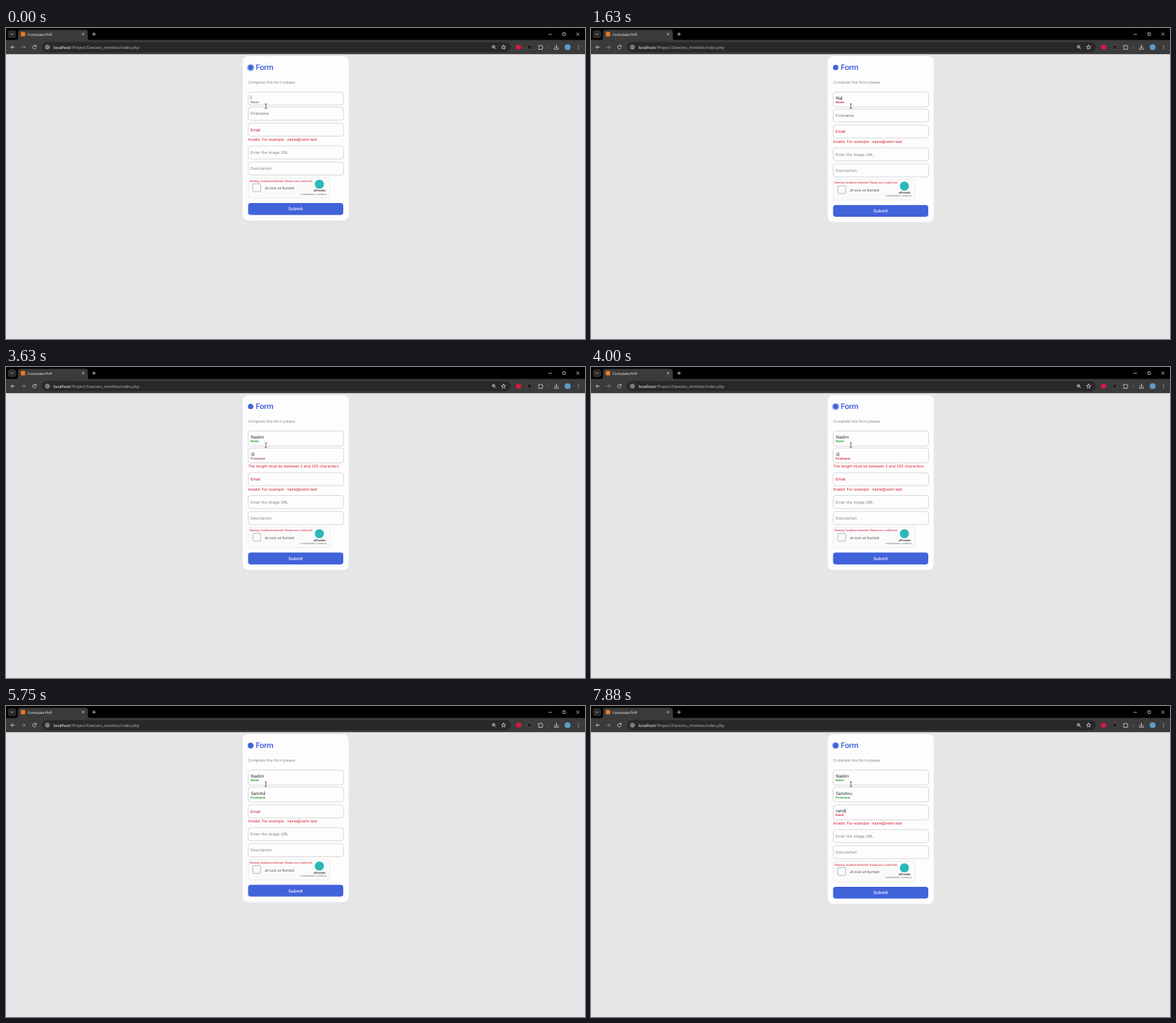
These frames come from a looping animation (800 by 430 pixels, 8000 ms). An HTML page:

```html
<!DOCTYPE html>
<html lang="en">
<head>
<meta charset="utf-8">
<title>Form</title>
<style>
  html, body { margin: 0; width: 100%; height: 100%; overflow: hidden; background: #e5e6e8; }
  svg { display: block; width: 100vw; height: 100vh; }
  text { text-rendering: geometricPrecision; white-space: pre; }
  .ui { font-family: Roboto, sans-serif; }
  .form { font-family: Inter, sans-serif; }
  .line { fill: none; stroke: #dedede; stroke-width: .75; stroke-linecap: round; stroke-linejoin: round; }
  .box { fill: #fdfdfe; stroke: #b9b9bc; stroke-width: .55; }
  .hint { font-size: 5.4px; fill: #808080; }
  .error { font-size: 5.25px; fill: #d9142f; }
  .typed { font-size: 6px; fill: #2b2b2b; }
</style>
</head>
<body>
<svg viewBox="0 0 800 430" xmlns="http://www.w3.org/2000/svg">
  <rect width="800" height="430" fill="#e5e6e8"/>
  <path d="M470 36H788V390H715L475 272Z" fill="#e6e6e6"/>

  <g class="ui">
    <rect width="800" height="17" fill="#000"/>
    <rect y="16.5" width="800" height="19.7" fill="#3b3b3b"/>
    <rect x="2.5" y="3" width="11.5" height="11" rx="3.5" fill="#2b2b2b"/>
    <path class="line" d="M6.8 7.8L8.3 9.3L9.8 7.8"/>
    <path d="M13 17Q16.5 17 16.5 13.5V6Q16.5 2.5 20 2.5H109.5Q113 2.5 113 6V13.5Q113 17 116.5 17Z" fill="#3b3b3b"/>
    <rect x="20.5" y="5.5" width="6" height="6" rx="1" fill="#f07a24"/>
    <text x="30" y="10.5" font-size="4.85" fill="#eee">Formulaire PHP</text>
    <path class="line" d="M105.2 7L108 9.8M108 7L105.2 9.8M119.5 8.5H123.7M121.6 6.4V10.6"/>
    <path class="line" d="M750 8.8H754M788.3 6.7L791.9 10.3M791.9 6.7L788.3 10.3"/>
    <rect class="line" x="769.5" y="6.8" width="3.6" height="3.6" rx=".5"/>

    <path class="line" d="M11.7 26.5H7M9.2 24.2L6.9 26.5L9.2 28.8"/>
    <path class="line" d="M21.7 26.5H26.4M24.2 24.2L26.5 26.5L24.2 28.8" opacity=".5"/>
    <path class="line" d="M41.3 25A2.5 2.5 0 1 0 41.7 27.2M41.7 23.7V25.4H39.9"/>
    <rect x="49.5" y="19.5" width="648" height="14" rx="7" fill="#282828"/>
    <circle cx="57.2" cy="26.5" r="4.6" fill="#3b3b3b"/>
    <circle class="line" cx="57.2" cy="26.5" r="2.4"/>
    <path class="line" d="M57.2 26.3V27.7M57.2 25.2V25.3"/>
    <text x="65.5" y="28.5" font-size="5.75" fill="#a8a8a8"><tspan fill="#f2f2f2">localhost</tspan>/Project/Dancers_mirettes/index.php</text>
    <circle class="line" cx="673.5" cy="25.9" r="1.8"/>
    <path class="line" d="M674.9 27.3L676.7 29.1M672.8 25.9H674.2"/>
    <path class="line" d="M687.5 23.6L688.3 25.5L690.4 25.7L688.8 27.1L689.3 29.2L687.5 28.1L685.7 29.2L686.2 27.1L684.6 25.7L686.7 25.5Z"/>
    <circle cx="708.3" cy="26.5" r="3.6" fill="#d81842"/>
    <rect x="720.7" y="23.7" width="5.6" height="5.6" rx="1" fill="#1f1f1f" stroke="#666" stroke-width=".5"/>
    <path class="line" d="M736 24.5H737.5A1 1 0 0 1 739.5 24.5H741V26A1 1 0 0 1 741 28V29.5H736V27.8A1 1 0 0 0 736 26Z"/>
    <path d="M749.7 23V30" stroke="#686868" stroke-width=".6"/>
    <path class="line" d="M760.5 23.5V27.5M758.7 25.9L760.5 27.7L762.3 25.9M757.8 27.7V29.4H763.2V27.7"/>
    <circle cx="776" cy="26.5" r="4.1" fill="#5b9bc9"/>
    <path class="line" style="stroke-width: 1.1" d="M791 24.2V24.3M791 26.5V26.6M791 28.8V28.9"/>
  </g>

  <g class="form">
    <rect id="card" x="327" y="39" width="146.5" height="227" rx="7.5" fill="#fdfdfe"/>
    <circle id="halo" cx="338" cy="54.7" r="3.6" fill="#4163da"/>
    <circle cx="338" cy="54.7" r="3.6" fill="#4163da"/>
    <text x="345.1" y="58.3" font-size="10.5" font-weight="600" letter-spacing="-.45" fill="#4163da">Form</text>
    <text x="334.5" y="77.2" font-size="5.25" fill="#858585">Complete this form please</text>
    <g id="fields"></g>
    <g id="rest">
      <rect class="box" x="334.6" width="132" height="18" rx="3.75"/>
      <text class="hint" x="338" y="11">Enter the image URL</text>
      <rect class="box" x="334.6" y="22.2" width="132" height="18" rx="3.75"/>
      <text class="hint" x="338" y="33.2">Description</text>
      <g class="ui" transform="translate(0 43.7)">
        <rect x="334.7" width="113" height="28.5" rx="1.5" fill="#fafafa" stroke="#dedede" stroke-width=".5"/>
        <text x="336.5" y="6" font-size="3.75" fill="#d9142f">Warning: localhost detected. Please use a valid host.</text>
        <rect x="341" y="8.7" width="10.8" height="10.8" rx="1.3" fill="#fafafa" stroke="#8d8d8d" stroke-width=".6"/>
        <text x="357.3" y="16.5" font-size="5.1" fill="#555">Je suis un humain</text>
        <circle cx="433" cy="9.2" r="6.3" fill="#2bb8b8"/>
        <text x="433.3" y="19.7" font-size="4.1" font-weight="700" text-anchor="middle" fill="#444">qProvelo</text>
        <text x="425" y="23.9" font-size="3" text-anchor="middle" fill="#555">Confidentialité - Conditions</text>
      </g>
      <rect x="334.5" y="79" width="131.5" height="16.3" rx="3.75" fill="#4163da"/>
      <text x="400" y="89.3" font-size="6" font-weight="500" text-anchor="middle" fill="#fff">Submit</text>
    </g>
  </g>

  <path d="M357.5 104.7Q359 104.7 359 105.7Q359 104.7 360.5 104.7M359 105.5V110.7M357.5 111.5Q359 111.5 359 110.5Q359 111.5 360.5 111.5" fill="none" stroke="#333" stroke-width=".7"/>
</svg>

<script>
const LOOP = 8000, STEP = 125, FADE = 300, ROW_GAP = 4.2, ERROR_ROW = 9.3;
const GREY = [110, 110, 110], RED = [214, 20, 45], GREEN = [20, 150, 30];
const LENGTH_ERROR = 'The length must be between 2 and 255 characters';

// keys: the time at which each letter appears
const fields = [
  { label: 'Name', text: 'Nadim', focus: -FADE, blur: 2700, gap: 2.8,
    keys: [1000, 1625, 1875, 2125, 2375] },
  { label: 'Firstname', text: 'Salvitou', focus: 2700, blur: 6375, gap: ROW_GAP,
    keys: [3505, 4125, 4500, 4875, 5125, 5375, 5625, 6000] },
  { label: 'Email', text: 'rand', focus: 6375, blur: LOOP, gap: ROW_GAP, email: true,
    keys: [7000, 7250, 7500, 7750] }
];

const $ = id => document.getElementById(id);

function add(parent, tag, attrs, content = '') {
  const el = document.createElementNS('http://www.w3.org/2000/svg', tag);
  set(el, attrs);
  el.textContent = content;
  return parent.appendChild(el);
}

function set(el, attrs) {
  for (const name in attrs) el.setAttribute(name, attrs[name]);
}

for (const f of fields) {
  f.group = add($('fields'), 'g', {});
  f.box = add(f.group, 'rect', { class: 'box', x: 334.6, width: 132, rx: 3.75 });
  f.name = add(f.group, 'text', { x: 338 }, f.label);
  f.typed = add(f.group, 'text', { class: 'typed', x: 338.2, y: 10.6 });
  f.caret = add(f.group, 'rect', { width: .5, height: 5.6, fill: '#222' });
  f.error = add(f.group, 'text', { class: 'error', x: 334.5 },
    f.email ? 'Invalid. For example : name@velm.test' : LENGTH_ERROR);
}

const lerp = (a, b, p) => a + (b - a) * p;
const easeOut = p => 1 - (1 - p) ** 2;
const progress = (t, start) => Math.min(1, Math.max(0, (t - start) / FADE));

function tone(f, count) {
  if (f.email || count === 1) return RED;
  return count ? GREEN : GREY;
}

function labelColor(f, count, t) {
  const to = tone(f, count);
  if (!count) return to;
  const p = progress(t, f.keys[count - 1]);
  return tone(f, count - 1).map((c, i) => Math.round(lerp(c, to[i], p)));
}

// Places one field at y and returns the top of the next row
function drawField(f, y, t) {
  const count = f.keys.filter(k => k <= t).length;
  const height = count ? 20.6 : 18;
  const lifted = progress(t, f.focus);
  const lastInput = count ? f.keys[count - 1] : Math.max(0, f.focus);
  const focused = t >= f.focus && t < f.blur;
  const blinkOn = Math.floor((t - lastInput) / 500) % 2 === 0;
  const invalid = f.email || count === 1;

  set(f.group, { transform: `translate(0 ${y})` });
  set(f.box, { height });
  set(f.name, {
    y: lerp(11, 15.7, lifted),
    'font-size': lerp(5.4, 4.2, lifted),
    'font-weight': lifted > .5 ? 600 : 400,
    fill: `rgb(${labelColor(f, count, t)})`
  });
  f.typed.textContent = f.text.slice(0, count);
  set(f.caret, {
    x: 338.3 + (count ? f.typed.getComputedTextLength() : 0),
    y: count ? 5.8 : 4.7,
    visibility: focused && blinkOn ? 'visible' : 'hidden'
  });
  set(f.error, { y: height + 6.7, visibility: invalid ? 'visible' : 'hidden' });
  return y + height + f.gap + (invalid ? ERROR_ROW : 0);
}

function draw(time) {
  const t = Math.floor(time % LOOP / STEP) * STEP;
  const pulse = easeOut((t / 1000 + .4) % 1);
  set($('halo'), { r: 3.6 * lerp(.9, 1.8, pulse), opacity: 1 - pulse });

  const y = fields.reduce((top, f) => drawField(f, top, t), 88.6);
  set($('rest'), { transform: `translate(0 ${y})` });
  set($('card'), { height: y + 102.9 - 39 });
}

const start = performance.now();
function tick() {
  draw(performance.now() - start);
  requestAnimationFrame(tick);
}
tick();
</script>
</body>
</html>
```
